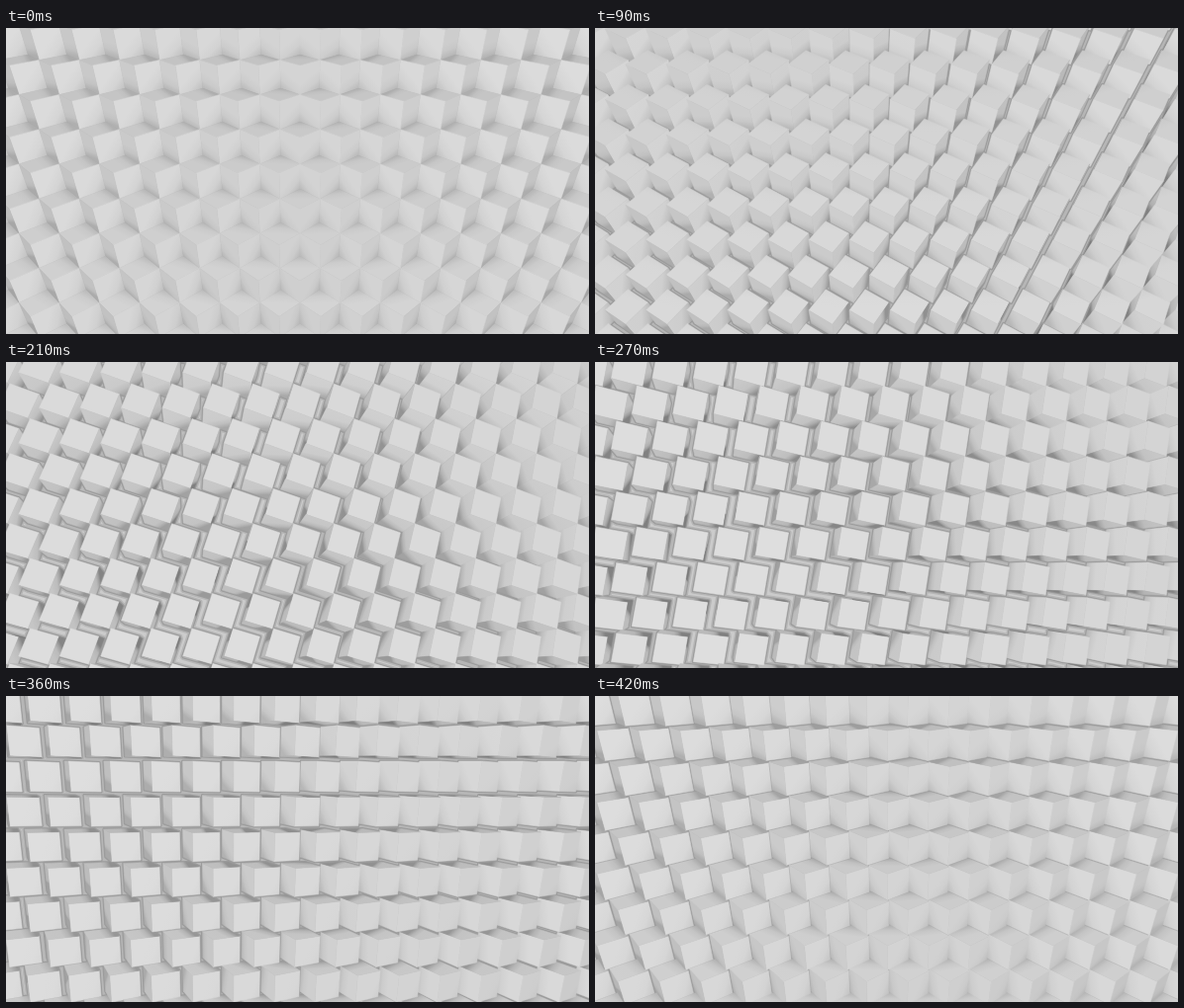
These frames come from a looping animation (589x310 px, 450 ms). An HTML page with a canvas:

```html
<!DOCTYPE html>
<html lang="en">
<head>
<meta charset="utf-8">
<title>Turning cubes</title>
<style>
html, body { margin: 0; width: 100%; height: 100%; overflow: hidden; background: #dadada; }
canvas { display: block; }
</style>
</head>
<body>
<canvas id="stage" width="589" height="310"></canvas>
<script>
const ctx = document.getElementById('stage').getContext('2d');
const STEP = 30, STEPS = 15;
const EYE = 500, CX = 297, CY = 222;              // camera distance and vanishing point
const PITCH = 39.9, ROW = PITCH * Math.sqrt(3) / 2;
const HALF = PITCH / Math.SQRT2 / 2;              // half a cube edge

// Cube axes seen along the body diagonal: top, right and minus left.
const a = Math.sqrt(1 / 3), b = Math.sqrt(2 / 3), c = Math.SQRT1_2;
const AXES = [[0, -b, a], [c, b / 2, a], [c, -b / 2, -a]];

const add = (p, q, k = 1) => p.map((v, i) => v + q[i] * k);
const dot = (p, q) => p[0] * q[0] + p[1] * q[1] + p[2] * q[2];
const project = ([x, y, z]) => {
  const k = EYE / (EYE - z);
  return [CX + x * k, CY + y * k];
};

// Hexagonal grid; cubes near the camera axis are painted last.
const cubes = [];
for (let j = -7; j <= 4; j++)
  for (let i = -9; i <= 9; i++)
    cubes.push([(i + (j & 1) / 2) * PITCH, -36.8 + j * ROW, 0]);
cubes.sort((p, q) => dot(q, q) - dot(p, p));

// Turn about another body diagonal: 120 degrees map the cube onto itself.
function turnedAxes(angle) {
  const cos = Math.cos(angle), sin = Math.sin(angle) * a;
  const w = [(1 + 2 * cos) / 3, (1 - cos) / 3 + sin, (1 - cos) / 3 - sin];
  return AXES.map((_, i) =>
    w.reduce((sum, k, n) => add(sum, AXES[(i + n) % 3], k), [0, 0, 0]));
}

function faceTypes(axes) {
  return [0, 1, 2].flatMap(i => [1, -1].map(sign => {
    const normal = axes[i].map(v => v * sign);
    const u = axes[(i + 1) % 3], v = axes[(i + 2) % 3];
    const corners = [[1, 1], [1, -1], [-1, -1], [-1, 1]].map(([m, n]) =>
      add(add(normal, u, m), v, n).map(k => k * HALF));
    const depth = HALF * (Math.abs(u[2]) + Math.abs(v[2]));
    const flat = 1 - normal[2] ** 2 + 1e-6;
    const slope = [normal[0] * normal[2], normal[1] * normal[2], -flat]
      .map(k => k * depth / flat);
    return { normal, corners, depth, slope };
  }));
}

function occlusion(z) {
  const k = Math.min(1.2, Math.max(0, (8 - z) / 22));
  return 1 - 0.22 * k * k;
}

function facePaint(face, centre, facing) {
  const light = 168 + 54 * Math.sqrt(facing);
  const from = project(add(centre, face.slope, -1));
  const to = project(add(centre, face.slope));
  const paint = ctx.createLinearGradient(...from, ...to);
  for (const s of [0, 0.5, 0.75, 1]) {
    const g = Math.round(light * occlusion(centre[2] + face.depth * (1 - 2 * s)));
    paint.addColorStop(s, `rgb(${g},${g},${g})`);
  }
  return paint;
}

function draw(step) {
  const types = faceTypes(turnedAxes(step / STEPS * Math.PI * 2 / 3));
  const outline = new Path2D(), faces = [];
  for (const cube of cubes) {
    for (const face of types) {
      const centre = add(cube, face.normal, HALF);
      const view = add([0, 0, EYE], centre, -1);
      const facing = dot(face.normal, view) / Math.hypot(...view);
      if (facing <= 0) continue;
      const path = new Path2D();
      face.corners.forEach(p => path.lineTo(...project(add(cube, p))));
      path.closePath();
      outline.addPath(path);
      faces.push([path, facePaint(face, centre, facing)]);
    }
  }
  ctx.fillStyle = '#dadada';
  ctx.fillRect(0, 0, 589, 310);
  ctx.lineJoin = 'round';
  // Soft contact shadow on the ground behind the cubes.
  for (const [width, alpha] of [[10, 0.07], [6, 0.1], [3, 0.15]]) {
    ctx.lineWidth = width;
    ctx.strokeStyle = `rgba(0,0,0,${alpha})`;
    ctx.stroke(outline);
  }
  ctx.lineWidth = 0.5;
  for (const [path, paint] of faces) {
    ctx.fillStyle = ctx.strokeStyle = paint;
    ctx.fill(path);
    ctx.stroke(path);
  }
}

let shown = -1;
function tick() {
  const step = Math.floor(performance.now() / STEP) % STEPS;
  if (step !== shown) draw(shown = step);
  requestAnimationFrame(tick);
}
tick();
</script>
</body>
</html>
```
